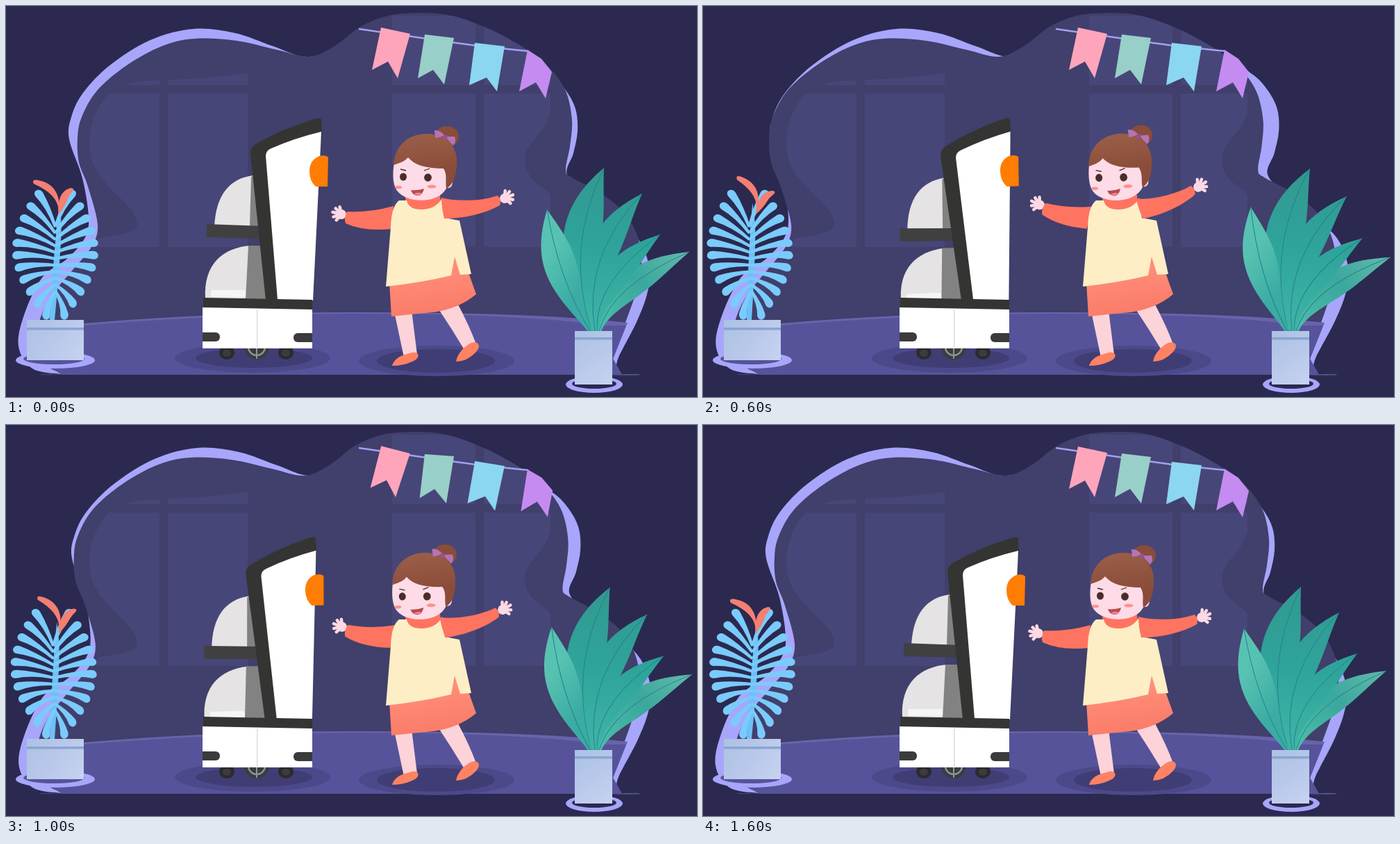
Write an HTML page with a canvas that moves like this. It is 995 px wide and 563 px high and loops after 1.8 s.

```html
<!DOCTYPE html>
<html lang="en">
<head>
<meta charset="utf-8">
<title>Robot and girl</title>
<style>
html, body { margin: 0; width: 100%; height: 100%; overflow: hidden; background: #2b2950; }
canvas { display: block; }
</style>
</head>
<body>
<canvas id="stage" width="995" height="563"></canvas>
<script>
const ctx = document.getElementById('stage').getContext('2d');
const STEP = 200, LOOP = 1800, PEAK = 600, REST = 1600;

// 0 at rest, 1 at the far end: quick lean out, slower return.
const sway = t => Math.max(0, Math.min(t / PEAK, (REST - t) / 900, 1));
// Sideways travel of the flag tips in pixels.
const flap = t => t < PEAK
  ? 2 * Math.sin(Math.PI * t / PEAK)
  : -3 * Math.sin(Math.PI * (t - PEAK) / (REST - PEAK));

function shape(d, color, line) {
  const path = d instanceof Path2D ? d : new Path2D(d);
  if (line) {
    ctx.strokeStyle = color;
    ctx.lineWidth = line;
    ctx.stroke(path);
  } else {
    ctx.fillStyle = color;
    ctx.fill(path);
  }
}

function oval(x, y, rx, ry, color, line) {
  const path = new Path2D();
  path.ellipse(x, y, rx, ry, 0, 0, Math.PI * 2);
  shape(path, color, line);
}

function box(x, y, w, h, color, r = 0) {
  const path = new Path2D();
  path.roundRect(x, y, w, h, r);
  shape(path, color);
}

function fade(x0, y0, x1, y1, ...colors) {
  const g = ctx.createLinearGradient(x0, y0, x1, y1);
  colors.forEach((c, i) => g.addColorStop(i / (colors.length - 1), c));
  return g;
}

function turned(x, y, angle, draw) {
  ctx.save();
  ctx.translate(x, y);
  ctx.rotate(angle);
  ctx.translate(-x, -y);
  draw();
  ctx.restore();
}

// Shear sideways, holding the line y = base still.
function leaning(base, k, draw) {
  ctx.save();
  ctx.transform(1, 0, -k, 1, k * base, 0);
  draw();
  ctx.restore();
}

// Closed smooth curve through points.
function smooth(text) {
  const pts = text.split(' ').map(p => p.split(',').map(Number));
  const at = i => pts[(i + pts.length) % pts.length];
  const path = new Path2D();
  path.moveTo(...pts[0]);
  pts.forEach((b, i) => {
    const a = at(i - 1), c = at(i + 1), d = at(i + 2);
    path.bezierCurveTo(
      b[0] + (c[0] - a[0]) / 6, b[1] + (c[1] - a[1]) / 6,
      c[0] - (d[0] - b[0]) / 6, c[1] - (d[1] - b[1]) / 6, c[0], c[1]);
  });
  return path;
}

const ribbon = smooth('437,73 510,52 620,34 745,78 783,98 805,120 820,148 823,180 817,212 808,243 838,274 ' +
  '880,306 912,338 927,380 923,415 908,455 882,506 875,530 850,530 110,530 80,530 38,522 18,490 ' +
  '26,445 52,391 88,364 113,335 119,305 110,248 91,192 94,160 111,125 150,85 208,49 270,33 330,39 385,58');
const cloud = smooth('437,73 474,57 510,30 550,14 595,10 642,14 700,35 758,68 788,95 807,125 815,165 812,202 806,236 ' +
  '815,247 852,267 886,293 907,325 915,362 911,400 894,450 876,495 870,530 850,530 110,530 86,530 56,516 43,485 ' +
  '50,448 67,415 96,380 123,347 132,315 118,260 105,225 103,190 109,160 131,122 173,86 224,58 272,47 332,50 390,63');

function drawRoom(q) {
  const pane = '#474678', lean = -.023 * q;
  leaning(531, .0176 * q, () => shape(ribbon, '#a8a6fb'));
  leaning(531, lean, () => {
    shape(cloud, '#413f6b');
    ctx.clip(cloud);
    leaning(531, -lean, () => {
      shape('M148 126C125 150 115 190 122 215C130 260 190 285 189 315C187 330 150 330 132 335L128 347H221V126Z', pane);
      shape('M174 114Q180 108 221 107V114ZM233 106Q300 104 348 96V114H233Z', pane);
      box(233, 126, 115, 221, pane);
      box(556, 14, 120, 100, pane);
      box(688, 18, 96, 96, pane);
      box(556, 126, 120, 221, pane);
      shape('M688 126H784V152C775 188 747 195 747 222C750 255 775 258 784 272V347H688Z', pane);
    });
  });
  const floorEnd = 'L874 508L887 531H82Q54 518 44 490L48 466Z';
  shape('M112 457Q300 441 500 441Q760 441 895 456' + floorEnd, '#6764ab');
  shape('M112 460Q300 444 500 443Q740 443 862 460H893' + floorEnd, '#56539a');
  oval(355, 507, 112, 21, '#4c498a');
  oval(357, 507, 84, 14, '#403d75');
  oval(620, 511, 112, 22, '#4c498a');
  oval(619, 511, 85, 17, '#403d75');
}

function drawFlags(shift) {
  shape('M508 33Q600 46 640 52T752 65', '#a3a0f0', 2.5);
  const flags = [
    ['M540 31L582 40L564 104L550 80L527 92Z', '#fea5bc', 560, 35],
    ['M603 41L645 46L631 113L615 92L593 104Z', '#98cfc8', 624, 44],
    ['M675 53L718 58L707 123L692 103L667 114Z', '#8bd6f1', 696, 56],
    ['M751 63L771 76L786 95L777 133L763 110L739 123Z', '#c48cf0', 768, 68]
  ];
  flags.forEach(([d, color, x, y], i) =>
    turned(x, y, (i % 2 ? 1 : -1) * shift / 66, () => shape(d, color)));
}

function drawRobot(q) {
  const dark = '#3b3b3b', frameColor = '#343532';
  oval(361, 491, 18, 18, '#3a3c3f');
  oval(361, 491, 12, 12, '#8e9496', 2.5);
  box(360, 490, 2, 18, '#8e9496');
  for (const x of [318, 403]) {
    oval(x, 499, 11, 10, '#2b2b2d');
    oval(x, 500, 6, 5, '#3c3c40');
  }
  turned(441, 465, -.04 * q, () => {
    shape('M300 318C302 272 322 248 356 244L362 318Z', '#e5e3e3');
    shape('M353 246L358 243L370 318H351Z', '#828282');
    shape('M287 421C284 372 312 348 352 345L354 421Z', '#e5e3e3');
    shape('M349 345H368L378 423H345Z', '#828282');
    box(295, 409, 50, 10, '#f6f5f5', 3);
    shape('M289 314L372 317V335L289 333Z', '#404041');
    shape('M352 212Q352 202 361 198Q395 178 440 164Q454 159 454 164L455 190L392 216L392 426L374 424Z', frameColor);
    shape('M374 216Q374 208 382 205Q416 190 454 181L442 424L391 423Z', '#ffffff');
    shape('M451 216Q460 214 464 218L463 260H446Q437 252 437 238Q437 222 451 216Z', '#ff7d03');
  });
  shape('M284 420L441 423V437H284Z', frameColor);
  shape('M283 434L441 437V493H283Z', '#ffffff');
  box(361, 437, 1.5, 55, '#dcdcdc');
  box(283, 470, 25, 13, dark, [0, 6, 6, 0]);
  box(414, 471, 27, 13, dark, [6, 0, 0, 6]);
}

// Hand with five fingers fanned around a heading.
function drawHand(x, y, heading) {
  const skin = '#fdd9e4';
  ctx.lineCap = 'round';
  oval(x, y, 7, 7, skin);
  for (let i = -2; i <= 2; i++) {
    const a = heading + i * .55, reach = 13 - Math.abs(i);
    shape(`M${x} ${y}L${x + reach * Math.cos(a)} ${y + reach * Math.sin(a)}`, skin, 4.5);
  }
}

function drawLeftArm(q) {
  turned(556, 303, .19 * q, () => {
    drawHand(483, 300, Math.PI + .25);
    shape('M558 288Q522 298 491 296Q486 305 489 313Q515 325 556 321Z', '#ff7460');
  });
}

function drawRightArm(q) {
  turned(634, 293, -.2 * q, () => {
    drawHand(718, 277, -.4);
    shape('M627 276C650 282 685 281 708 273Q714 280 711 287C690 299 660 306 631 306Q627 290 627 276Z', '#ff7460');
  });
}

function drawHead(q) {
  turned(600, 284, -.05 * q, () => {
    const hair = fade(600, 184, 606, 240, '#9a5e48', '#8a4c39');
    const ink = '#4a2c28';
    oval(635, 188, 17, 15, '#8a4c3b');
    oval(637, 254, 6, 8, '#fcd0dc');
    shape('M561 215C556 238 556 257 564 267C578 284 618 284 631 267C641 256 641 235 636 216Z', '#fddbe7');
    shape('M558 229C560 197 584 183 608 184C640 186 651 208 649 228C648 248 643 257 634 263C632 253 636 243 630 234' +
      'C605 234 588 229 579 218C573 225 566 226 558 229Z', hair);
    shape('M617 179Q625 178 632 187L618 190ZM632 188L646 188Q649 195 644 201Z', '#b574b5');
    oval(632, 189, 3.5, 3.5, '#925390');
    oval(572, 246, 5, 5.6, ink);
    oval(607.5, 247, 5.4, 5.8, ink);
    shape('M568 235L576 237M602 237L610 234', ink, 1.3);
    oval(565, 261, 5, 2.3, '#ff918c');
    oval(613, 260, 6.5, 2.5, '#ff918c');
    shape('M583 265Q592 266 602 263Q600 273 592 273Q585 272 583 265Z', '#b84b52');
    shape('M587 271Q593 267 599 270Q595 274 587 271Z', '#f4858b');
  });
}

function drawGirl(q) {
  const skin = '#fcd3d9', shoe = '#ff8262';
  shape('M559 440L584 438L592 502L573 506Z', skin);
  shape('M622 435L650 428Q668 462 677 487L660 495Q642 465 622 435Z', skin);
  shape('M556 518C560 505 573 502 585 499C595 497 598 507 585 512Q572 518 556 518Z', shoe);
  shape('M648 512C650 500 660 490 670 485C680 482 685 489 677 498Q664 512 648 512Z', shoe);
  shape('M552 398L555 447Q591 443 615 441Q652 436 677 415L666 384L645 355Z',
    fade(610, 380, 620, 445, '#ff8d79', '#fa7b67'));
  drawLeftArm(q);
  shape('M575 274L625 272L627 296H576Z', '#ff7460');
  shape('M566 280Q555 288 554 318L547 404Q600 398 641 388L646 361L654 387L670 386L653 309L632 305' +
    'L628 276Q621 291 601 293Q580 294 577 280Z', '#fdeec5');
  drawRightArm(q);
  drawHead(q);
}

// Round-tipped, slightly arched leaf growing from a thin root.
function frond(x, y, tipX, tipY) {
  const len = Math.hypot(tipX - x, tipY - y);
  ctx.save();
  ctx.translate(x, y);
  ctx.rotate(Math.atan2(tipY - y, tipX - x));
  shape(`M0 -2Q${len * .5} -7 ${len - 8} -6C${len + 2} -6 ${len + 3} 7 ${len - 7} 6Q${len * .5} -1 0 2Z`, '#7acbfb');
  ctx.restore();
}

function drawPot(x, y, w, h, band) {
  box(x, y, w, h, fade(x, y, x + w, y + h, '#abc2e4', '#b9c8ea', '#c6d3f1'));
  box(x, y + band, w, 3.5, '#8ba4d2');
}

function drawFernPlant(q) {
  const count = 11;
  oval(71, 510, 57, 12, '#a8a6fb');
  oval(69, 508, 44, 8, '#56539a');
  leaning(452, -.034 * q, () => {
    shape('M77 284Q69 345 63 452H70Q76 390 79 340Q81 310 77 284Z', '#6cc1f6');
    for (const side of [-1, 1]) {
      ctx.save();
      ctx.translate(71, 0);
      ctx.scale(side, 1);
      for (let i = 0; i < count; i++) {
        const s = i / (count - 1);
        frond(0, 318 + 92 * s, 62 * Math.sin(Math.PI * (.14 + .78 * s)), 265 + 186 * s);
      }
      ctx.restore();
    }
  });
  turned(76, 300, .19 * q, () => {
    shape('M76 300C77 278 62 266 40 256C36 249 44 250 51 252C70 257 80 274 76 300Z', '#f47f72');
    shape('M76 300C73 280 80 264 94 262C101 263 94 268 90 275Q85 289 76 300Z', '#f47f72');
  });
  drawPot(30, 452, 82, 58, 11);
}

// Pointed leaf swelling along a bent midrib; narrow at the root.
function blade(rootX, bendX, bendY, tipX, tipY, half, color) {
  const rootY = 468, left = [], right = [];
  for (let i = 0; i <= 24; i++) {
    const s = i / 24, r = 1 - s;
    const x = r * r * rootX + 2 * r * s * bendX + s * s * tipX;
    const y = r * r * rootY + 2 * r * s * bendY + s * s * tipY;
    const a = Math.atan2(
      r * (bendY - rootY) + s * (tipY - bendY),
      r * (bendX - rootX) + s * (tipX - bendX));
    const w = half * Math.sin(Math.PI * s ** 1.35) + 3 * r;
    left.push(`${x + w * Math.sin(a)} ${y - w * Math.cos(a)}`);
    right.unshift(`${x - w * Math.sin(a)} ${y + w * Math.cos(a)}`);
  }
  shape(`M${left.concat(right).join('L')}Z`, color);
  shape(`M${rootX} ${rootY}Q${bendX} ${bendY} ${tipX} ${tipY}`, '#23828a', 1);
}

function drawLeafPlant(q) {
  oval(847, 545, 41, 12, '#a8a6fb');
  oval(847, 544, 32, 7, '#2b2950');
  const light = fade(780, 360, 835, 400, '#58c2b2', '#3aaca3');
  const deep = fade(860, 240, 840, 460, '#329991', '#2ea49b', '#3fb3a6');
  const pale = fade(984, 354, 860, 460, '#62baab', '#3ba79d', '#49bda9');
  turned(846, 468, .055 * q, () => {
    blade(854, 871, 403, 984, 354, 17, pale);
    blade(851, 847, 397, 942, 329, 17, deep);
    blade(848, 830, 361, 916, 270, 20, deep);
    blade(843, 804, 350, 861, 233, 26, deep);
    blade(841, 796, 395, 779, 293, 22, light);
  });
  drawPot(819, 468, 54, 77, 9);
}

function drawScene(time) {
  const t = Math.floor(time % LOOP / STEP) * STEP;
  const q = sway(t);
  ctx.fillStyle = '#2b2950';
  ctx.fillRect(0, 0, 995, 563);
  drawRoom(q);
  drawFlags(flap(t));
  drawRobot(q);
  drawGirl(q);
  drawFernPlant(q);
  drawLeafPlant(q);
}

let start;
function tick(now) {
  start ??= now;
  drawScene(Math.max(0, now - start));
  requestAnimationFrame(tick);
}
drawScene(0);
requestAnimationFrame(tick);
</script>
</body>
</html>
```
